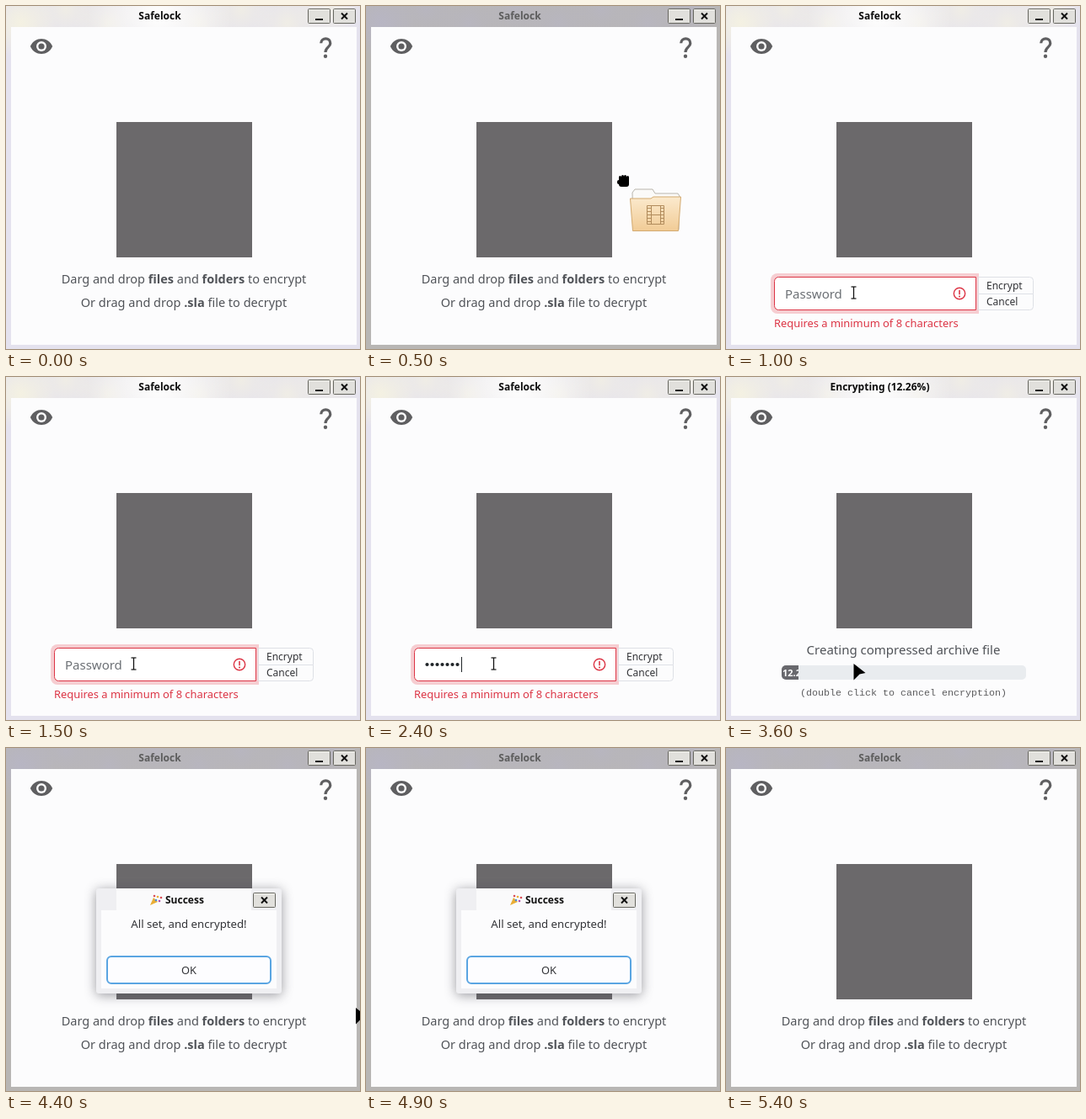
Write an HTML page with a canvas that moves like this. It is 420 px wide and 408 px high and loops after 5500 ms.

```html
<!DOCTYPE html>
<html lang="en">
<head>
<meta charset="utf-8">
<title>Safelock</title>
<style>
  html, body { margin: 0; width: 100%; height: 100%; overflow: hidden; background: #fcfcfd; }
  canvas { display: block; width: 420px; height: 408px; }
</style>
</head>
<body>
<canvas id="stage" width="420" height="408"></canvas>
<script>
const ctx = document.getElementById('stage').getContext('2d');
const LOOP = 5500, STEP = 100;
const SANS = '"Noto Sans", sans-serif';
const MONO = '"Liberation Mono", monospace';
const PAPER = '#fcfcfd', INK = '#505358', RED = '#dc3545', GREEN = '#198754';

const clamp = v => Math.max(0, Math.min(1, v));

// Interpolates [time, ...values] keys.
function track(keys, t) {
  if (t <= keys[0][0]) return keys[0].slice(1);
  for (let i = 1; i < keys.length; i++) {
    const a = keys[i - 1], b = keys[i];
    if (t <= b[0]) {
      const k = (t - a[0]) / (b[0] - a[0]);
      return a.slice(1).map((v, j) => v + (b[j + 1] - v) * k);
    }
  }
  return keys[keys.length - 1].slice(1);
}

function box(x, y, w, h, radius, fill, stroke, width = 1) {
  ctx.beginPath();
  ctx.roundRect(x, y, w, h, radius);
  if (fill) { ctx.fillStyle = fill; ctx.fill(); }
  if (stroke) { ctx.strokeStyle = stroke; ctx.lineWidth = width; ctx.stroke(); }
}

function disc(x, y, r, fill) {
  ctx.beginPath();
  ctx.arc(x, y, r, 0, 7);
  ctx.fillStyle = fill;
  ctx.fill();
}

function polygon(points, fill, stroke) {
  ctx.beginPath();
  points.forEach(([x, y]) => ctx.lineTo(x, y));
  ctx.closePath();
  if (fill) { ctx.fillStyle = fill; ctx.fill(); }
  if (stroke) { ctx.strokeStyle = stroke; ctx.lineWidth = 1; ctx.stroke(); }
}

function line(x1, y1, x2, y2, color, width) {
  ctx.beginPath();
  ctx.moveTo(x1, y1);
  ctx.lineTo(x2, y2);
  ctx.strokeStyle = color;
  ctx.lineWidth = width;
  ctx.stroke();
}

function text(str, x, y, size, color, { weight = 400, align = 'left', family = SANS } = {}) {
  ctx.font = `${weight} ${size}px ${family}`;
  ctx.textAlign = align;
  ctx.fillStyle = color;
  ctx.fillText(str, x, y);
}

// Runs alternate between medium and bold weight.
function richLine(runs, center, y, size, color) {
  const weight = i => i % 2 ? 700 : 500;
  const widths = runs.map((run, i) => {
    ctx.font = `${weight(i)} ${size}px ${SANS}`;
    return ctx.measureText(run).width;
  });
  let x = center - widths.reduce((a, b) => a + b) / 2;
  runs.forEach((run, i) => {
    text(run, x, y, size, color, { weight: weight(i) });
    x += widths[i];
  });
}

function titleButton(x, y, close) {
  box(x + .5, y + .5, 26, 17, 1, '#e1e0dc', '#66665f');
  line(x + 2, y + 1.5, x + 25, y + 1.5, '#f7f7f2', 1);
  if (close) {
    line(x + 10, y + 5.5, x + 17, y + 12.5, '#111', 2);
    line(x + 17, y + 5.5, x + 10, y + 12.5, '#111', 2);
  } else {
    line(x + 9, y + 13, x + 18, y + 13, '#111', 2);
  }
}

function glow(x, y, r, rgb, alpha) {
  const g = ctx.createRadialGradient(x, y, 0, x, y, r);
  g.addColorStop(0, `rgba(${rgb},${alpha})`);
  g.addColorStop(1, `rgba(${rgb},0)`);
  ctx.fillStyle = g;
  ctx.fillRect(x - r, y - r, 2 * r, 2 * r);
}

function windowFrame(title, active) {
  ctx.fillStyle = active ? '#e4e2ee' : '#b8b6b4';
  ctx.fillRect(0, 0, 420, 408);
  for (let i = 0; i < 9; i++) {
    const x = (i * 157 + 20) % 420;
    glow(x, i % 2 ? 4 : 20, 42, active ? '247,244,224' : '183,181,198', .6);
  }
  if (active) glow(182, 12, 85, '255,255,255', .95);
  text(title, 182.5, 16, 12, active ? '#0c0c0c' : '#5c5c5c', { weight: 700, align: 'center' });
  titleButton(358, 3, false);
  titleButton(388, 3, true);
  ctx.fillStyle = PAPER;
  ctx.fillRect(6, 25, 410, 378);
}

function eyeIcon(x, y) {
  ctx.beginPath();
  ctx.moveTo(x - 13.2, y);
  ctx.bezierCurveTo(x - 8, y - 12, x + 8, y - 12, x + 13.2, y);
  ctx.bezierCurveTo(x + 8, y + 12, x - 8, y + 12, x - 13.2, y);
  ctx.fillStyle = '#5f5f61';
  ctx.fill();
  disc(x, y, 6, PAPER);
  disc(x, y, 3.6, '#5f5f61');
}

function helpIcon(x, y) {
  ctx.beginPath();
  ctx.moveTo(x - 5.3, y - 4.7);
  ctx.bezierCurveTo(x - 5, y - 12, x + 5.8, y - 12, x + 5.8, y - 4.5);
  ctx.bezierCurveTo(x + 5.8, y, x, y, x, y + 6);
  ctx.strokeStyle = '#5f5f61';
  ctx.lineWidth = 3.2;
  ctx.stroke();
  disc(x, y + 10.8, 2.2, '#5f5f61');
}

function dropHint() {
  richLine(['Darg and drop ', 'files', ' and ', 'folders', ' to encrypt'], 211, 330, 14.5, INK);
  richLine(['Or drag and drop ', '.sla', ' file to decrypt'], 211, 358, 14.5, INK);
}

function warningIcon(x, y) {
  ctx.beginPath();
  ctx.arc(x, y, 6.7, 0, 7);
  ctx.strokeStyle = RED;
  ctx.lineWidth = 1.4;
  ctx.stroke();
  line(x, y - 4, x, y + 1.3, RED, 1.6);
  disc(x, y + 3.6, 1, RED);
}

function checkIcon(x, y) {
  line(x - 5.5, y, x - 1.5, y + 4, GREEN, 2);
  line(x - 2, y + 4, x + 6, y - 4, GREEN, 2);
}

function passwordForm(count) {
  const valid = count >= 8;
  box(53, 318, 247, 48, [8, 0, 0, 8], valid ? '#c8e2d6' : '#f6cdd1');
  box(299.5, 322.5, 65, 20, [0, 4, 0, 0], PAPER, '#dee0e6');
  box(299.5, 342.5, 65, 19, [0, 0, 4, 0], PAPER, '#dee0e6');
  box(57.5, 322.5, 239, 39, [5, 0, 0, 5], '#fff', valid ? GREEN : RED);
  text('Encrypt', 309, 337, 12, '#333438');
  text('Cancel', 309, 356, 12, '#333438');
  if (count) {
    for (let i = 0; i < count; i++) disc(72.5 + i * 6, 342, 2.1, '#212529');
    const caret = 71.5 + count * 6;
    line(caret, 333, caret, 351, '#212529', 1);
  } else {
    text('Password', 70, 348, 15, '#6c7075');
  }
  if (valid) {
    checkIcon(277, 342);
  } else {
    warningIcon(277, 342);
    text('Requires a minimum of 8 characters', 57, 382, 12.9, RED);
  }
}

function progress(percent, filled) {
  text('Creating compressed archive file', 210.5, 330, 15, INK, { weight: 500, align: 'center' });
  box(66, 343, 290, 17, 5, '#e9ecef');
  const width = 290 * filled / 100;
  ctx.save();
  ctx.beginPath();
  ctx.roundRect(66, 343, 290, 17, 5);
  ctx.clip();
  ctx.beginPath();
  ctx.rect(66, 343, width, 17);
  ctx.clip();
  ctx.fillStyle = '#68686d';
  ctx.fillRect(66, 343, width, 17);
  const label = percent.toFixed(2) + '%';
  ctx.font = `600 11px ${SANS}`;
  const x = Math.max(67, 66 + (width - ctx.measureText(label).width) / 2);
  text(label, x, 355.5, 11, '#fff', { weight: 600 });
  ctx.restore();
  text('(double click to cancel encryption)', 210.5, 379, 11.67, '#5c5c5e', { align: 'center', family: MONO });
}

function partyIcon(x, y) {
  polygon([[x, y + 13], [x + 4, y + 4], [x + 9, y + 9]], '#e9ad35');
  ['#d94b55', '#4c8fd6', '#e9ad35', '#b44dab', '#d94b55'].forEach((color, i) =>
    disc(x + 5 + i * 2, y + 2 + (i * 5) % 9, 1.3, color));
}

function successDialog() {
  ctx.save();
  ctx.shadowColor = 'rgba(70,70,80,.55)';
  ctx.shadowBlur = 14;
  ctx.shadowOffsetY = 2;
  box(107, 167, 220, 125, 3, '#efeff2');
  ctx.restore();
  box(131, 167, 160, 26, 0, '#fafafb');
  partyIcon(171, 174);
  text('Success', 189, 185, 12, '#111', { weight: 700 });
  titleButton(293, 172, true);
  ctx.fillStyle = PAPER;
  ctx.fillRect(113, 193, 208, 93);
  text('All set, and encrypted!', 217, 214, 13.2, '#333438', { align: 'center' });
  box(120, 248, 194, 32, 5, '#fdfdff', '#5aa5e2', 2);
  text('OK', 217, 269, 12.8, '#333438', { align: 'center' });
}

function folder(x, y) {
  ctx.save();
  ctx.translate(x, y);
  polygon([[4, 48], [3, 4], [6, 0], [27, 0], [30, 5], [57, 5], [59, 8], [58, 48]], '#fbfaf8', '#b9b5ad');
  const g = ctx.createLinearGradient(0, 10, 0, 50);
  g.addColorStop(0, '#fbe9cc');
  g.addColorStop(1, '#f1cb95');
  polygon([[.5, 11], [25, 11], [28, 9], [60.5, 9], [57.5, 49.5], [3.5, 49.5]], g, '#d3aa70');
  const brown = '#b18b5b';
  box(20.5, 19.5, 20, 22, 0, null, brown);
  for (const offset of [25, 36]) line(offset + .5, 19, offset + .5, 42, brown, 1);
  line(25, 30.5, 36, 30.5, brown, 1);
  for (let row = 22.5; row < 41; row += 4) {
    line(20, row, 25, row, brown, 1);
    line(36, row, 41, row, brown, 1);
  }
  ctx.restore();
}

function grabHand(x, y) {
  box(x - 5, y - 3, 12, 11, 3, '#000');
  for (let i = 0; i < 4; i++) box(x - 5 + i * 3, y - (i === 1 || i === 2 ? 6 : 5), 3, 8, 1.5, '#000');
  box(x - 7, y, 5, 5, 2, '#000');
}

function arrow(x, y) {
  polygon([[x, y], [x + 14, y + 11], [x + 7, y + 12.5], [x, y + 19.5]], '#000');
}

function beam(x, y) {
  line(x, y - 7, x, y + 7, '#111', 1.3);
  line(x - 3, y - 7, x + 3, y - 7, '#111', 1.2);
  line(x - 3, y + 7, x + 3, y + 7, '#111', 1.2);
}

// The folder is dropped where the pointer then rests until the work is done.
const POINTER = [[300, 430, 190], [500, 305, 207], [900, 151.5, 341], [4200, 151.5, 341], [4400, 415, 309], [4500, 547, 293]];
const PERCENT = [[3500, 0], [3600, 12.26], [4300, 100]];
const FILLED = [[3500, 0], [3600, 6.9], [4300, 94]];

function draw(t) {
  const dragging = t >= 200 && t < 1000;
  const asking = t >= 1000 && t < 3400;
  const working = t >= 3400 && t < 4300;
  const dialog = t >= 4300 && t < 5000;
  const active = t < 200 || asking || working;
  const [percent] = track(PERCENT, t);
  const [x, y] = track(POINTER, t);

  windowFrame(working ? `Encrypting (${percent.toFixed(2)}%)` : 'Safelock', active);
  eyeIcon(42, 48);
  helpIcon(379, 49);
  ctx.fillStyle = '#6b696b';
  ctx.fillRect(131, 138, 161, 161);

  if (asking) passwordForm(Math.round(clamp((t - 1700) / 1200) * 12));
  else if (working) progress(percent, track(FILLED, t)[0]);
  else dropHint();
  if (dialog) successDialog();

  if (dragging) {
    folder(x + 8, y + 11);
    grabHand(x, y);
  } else if (asking) {
    beam(x, y);
  } else if (t >= 1000) {
    arrow(x, y);
  }
}

const start = performance.now();
function tick() {
  const t = (performance.now() - start) % LOOP;
  draw(Math.floor(t / STEP) * STEP);
  requestAnimationFrame(tick);
}
tick();
</script>
</body>
</html>
```
